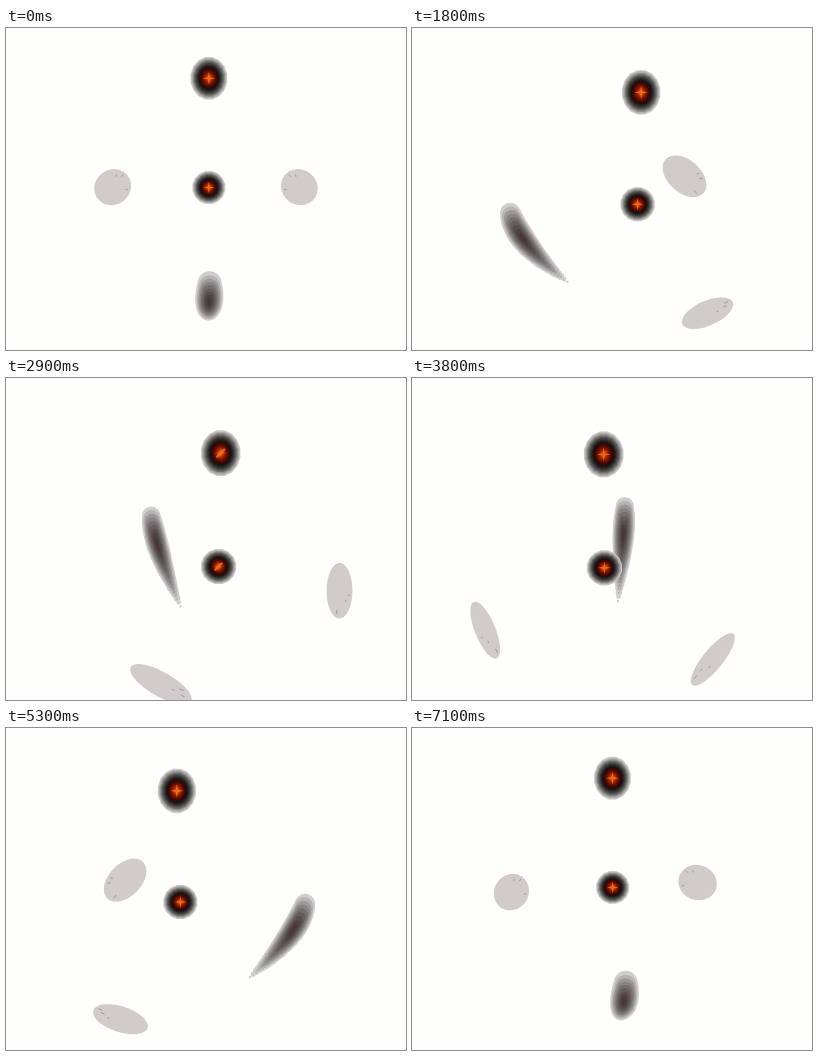
An HTML page for the animation above (7200 ms loop, 400 by 322 pixels).

```html
<!DOCTYPE html>
<html lang="en">
<head>
<meta charset="utf-8">
<title>Rotating density</title>
<style>
html, body { margin: 0; width: 100%; height: 100%; overflow: hidden; background: #fefefc; }
svg { display: block; width: 400px; height: 322px; }
</style>
</head>
<body>
<svg id="stage" viewBox="0 0 400 322"></svg>
<script>
const NS = 'http://www.w3.org/2000/svg';
const stage = document.getElementById('stage');
const SIN = 0.588, COS = 0.81, DIST = 614;
const LOOP = 7200, STEP = 100;

function add(parent, tag, attrs = {}) {
  const el = document.createElementNS(NS, tag);
  for (const k in attrs) el.setAttribute(k, attrs[k]);
  return parent.appendChild(el);
}

// Body point (x right, z toward viewer, h up) turned about the vertical axis.
function project([x0, z0, h], a) {
  const x = x0 * Math.cos(a) - z0 * Math.sin(a);
  const z = x0 * Math.sin(a) + z0 * Math.cos(a);
  const w = 1 - (z * COS + h * SIN) / DIST;
  return [200 + x / w, 161 + (SIN * z - COS * h) / w, w];
}

const plus = (p, q, k = 1) => p.map((v, i) => v + k * q[i]);
const fix = p => p[0].toFixed(2) + ' ' + p[1].toFixed(2);

// Pale lobes: a tilted ellipsoid given by its covariance, one mirrored.
const PALE = [-109.5, -87.2, -60.6];
const COV = [[335, -335, -205], [-335, 640, 100], [-205, 100, 489]];
const NICKS = [[3.2, -17, 6.4], [10.8, -20, 4.2], [15.7, -13.9, -14.1]];

function paleLobe(mirror) {
  const g = add(stage, 'g', mirror ? { transform: 'translate(400) scale(-1 1)' } : {});
  const body = add(g, 'path', { fill: '#d2cbcc' });
  const nick = add(g, 'path', { fill: 'none', stroke: '#9f9899', 'stroke-width': 1 });
  return turn => {
    const a = mirror ? -turn : turn;
    const c = project(PALE, a);
    const axes = [[1, 0, 0], [0, 1, 0], [0, 0, 1]].map(e => plus(project(plus(PALE, e), a), c, -1));
    const cov = (m, n) => {
      let sum = 0;
      for (let i = 0; i < 3; i++)
        for (let j = 0; j < 3; j++) sum += axes[i][m] * COV[i][j] * axes[j][n];
      return sum;
    };
    const p = Math.sqrt(cov(0, 0)), q = cov(0, 1) / p;
    const r = Math.sqrt(Math.max(0, cov(1, 1) - q * q));
    const pts = [];
    for (let i = 0; i < 26; i++) {
      const f = i / 26 * 2 * Math.PI;
      pts.push(fix([c[0] + p * Math.cos(f), c[1] + q * Math.cos(f) + r * Math.sin(f)]));
    }
    body.setAttribute('d', 'M' + pts.join('L') + 'Z');
    nick.setAttribute('d', NICKS.map(n =>
      'M' + fix(project(plus(PALE, n), a)) + 'L' + fix(project(plus(PALE, n, 0.82), a))).join(''));
  };
}

// Dark crescent: nested shells of circles swept along a curve.
const SHELLS = [
  [1, '#d0cdcd'], [0.89, '#b6b3b3'], [0.79, '#9c9899'], [0.69, '#878283'], [0.59, '#746e6f'],
  [0.48, '#655d5d'], [0.37, '#594e4e'], [0.26, '#4f4141'], [0.14, '#4c3536']
];
const bez = (t, a, b, c) => (1 - t) ** 2 * a + 2 * t * (1 - t) * b + t * t * c;

function crescent() {
  const g = add(stage, 'g');
  const paths = SHELLS.map(([, fill]) => add(g, 'path', { fill }));
  return a => SHELLS.forEach(([k], n) => {
    let d = '';
    for (let i = 0; i <= 28; i++) {
      const s = i / 28, t = 0.38 + (s - 0.38) * k;
      const r = bez(t, 104, 100, 50), h = bez(t, -28, -70, -127);
      const [x, y, w] = project([0.031 * r, r, h], a);
      const rad = 13 * k * Math.sin(Math.PI * (0.28 + 0.7 * s)) ** 0.8 / w;
      const R = rad.toFixed(2), D = (2 * rad).toFixed(2);
      d += `M${fix([x - rad, y])}a${R} ${R} 0 1 1 ${D} 0a${R} ${R} 0 1 1 -${D} 0Z`;
    }
    paths[n].setAttribute('d', d);
  });
}

// Hot cores: concentric rings and a small glowing star.
const RINGS = [
  [1, '#cbc8c8'], [0.94, '#b0adad'], [0.88, '#918e8e'], [0.82, '#706d6d'], [0.76, '#545151'],
  [0.69, '#3a3737'], [0.62, '#262323'], [0.55, '#1d1110'], [0.48, '#300b08'], [0.41, '#4d0b05'],
  [0.34, '#6e1004'], [0.27, '#8f1a03'], [0.2, '#ad2c04'], [0.13, '#c94708']
];

function hotCore(pos, rx, ry) {
  const g = add(stage, 'g');
  for (const [k, fill] of RINGS) {
    const pts = [];
    for (let i = 0; i < 16; i++) {
      const f = (i + 0.5) / 16 * 2 * Math.PI;
      pts.push(fix([rx * k * Math.cos(f) * 1.01, ry * k * Math.sin(f) * 1.01]));
    }
    add(g, 'polygon', { points: pts.join(' '), fill });
  }
  const star = add(g, 'path', { d: 'M0-6L1-1L6 0L1 1L0 6L-1 1L-6 0L-1-1Z', fill: '#e8701a' });
  const streak = add(g, 'ellipse', { rx: 5.5, ry: 1.5, fill: '#e8701a', transform: 'rotate(-45)' });
  return a => {
    const [x, y, w] = project(pos, a);
    g.setAttribute('transform', `translate(${fix([x, y])}) scale(${(1 / w).toFixed(4)})`);
    const mix = Math.sin(2 * a) ** 2;
    star.setAttribute('opacity', (1 - 0.8 * mix).toFixed(3));
    streak.setAttribute('opacity', mix.toFixed(3));
  };
}

const parts = [
  paleLobe(false), paleLobe(true), crescent(),
  hotCore([3, -25.9, -16.9], 17.4, 17.4),
  hotCore([2.7, -26, 108.4], 17.2, 20)
];

function draw(ms) {
  const a = Math.floor(ms % LOOP / STEP) * STEP / LOOP * 2 * Math.PI;
  parts.forEach(update => update(a));
}

const start = performance.now();
function tick() {
  draw(performance.now() - start);
  requestAnimationFrame(tick);
}
draw(0);
requestAnimationFrame(tick);
</script>
</body>
</html>
```
